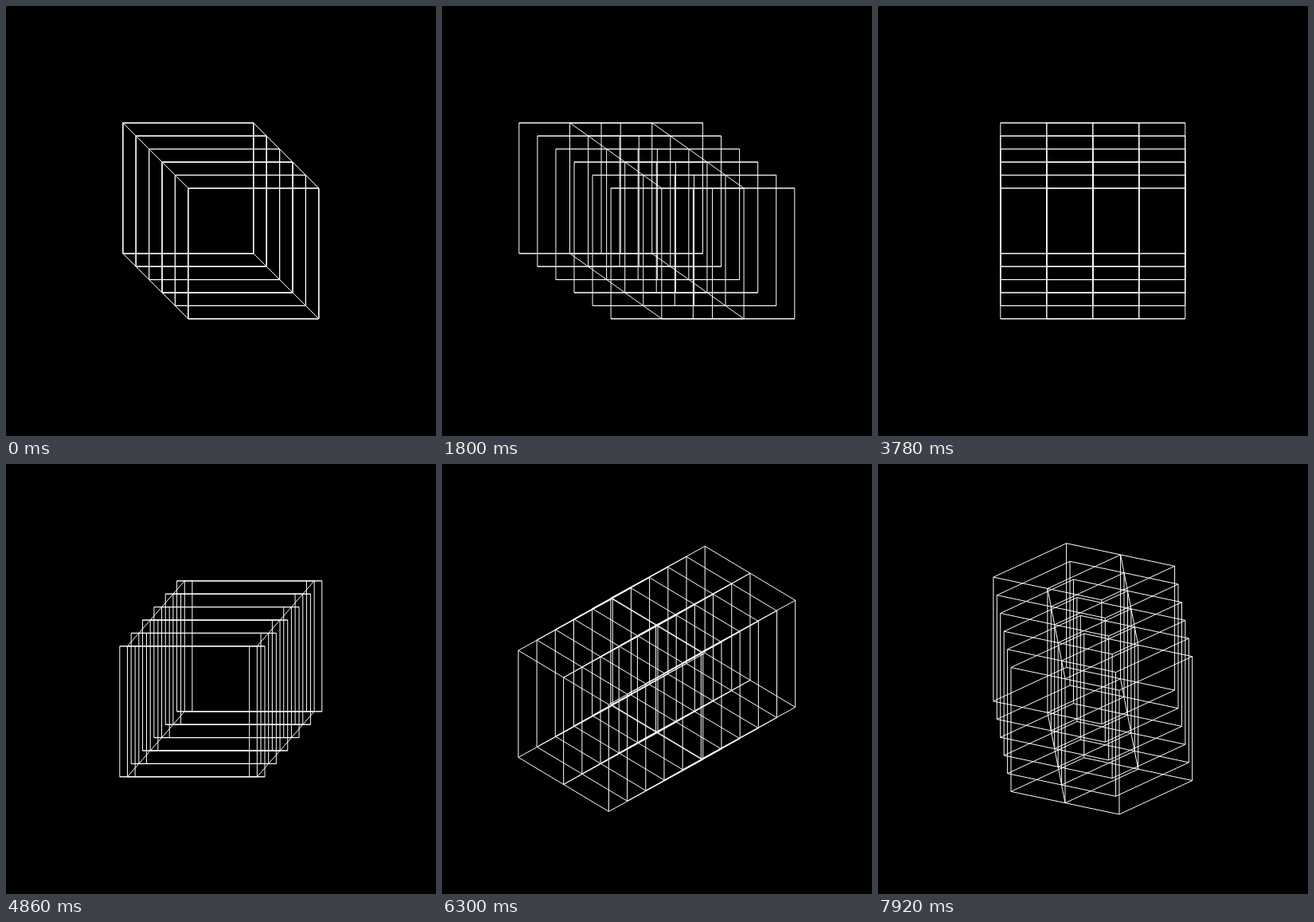
Write an HTML page with a canvas that moves like this. It is 540 px wide and 540 px high and loops after 8000 ms.

```html
<!DOCTYPE html>
<html lang="en">
<head>
<meta charset="utf-8">
<title>Stacked wire cubes</title>
<style>
  html, body { margin: 0; width: 100%; height: 100%; overflow: hidden; background: #000; }
  canvas { display: block; width: 540px; height: 540px; }
</style>
</head>
<body>
<canvas id="stage" width="540" height="540"></canvas>
<script>
const ctx = document.getElementById("stage").getContext("2d");
const LOOP = 8000, CENTER = 269.8, HALF = 82, LAYERS = 6, GAP = 16.4, TURN = 710;

// Each pose: middle of the turn that leads to it (ms), yaw and pitch in degrees
const poses = [
  [0, 0, 0],
  [635, 45, 0],
  [1986, 89.4, 0],
  [3335, 135, 0],
  [4686, 180, 0],
  [6020, 225, 36],
  [7380, 304, 198.2]
];

const rad = deg => deg * Math.PI / 180;
const ease = p => (1 - Math.cos(Math.PI * Math.min(1, Math.max(0, p)))) / 2;

function poseAt(t) {
  let [, yaw, pitch] = poses[0];
  for (let i = 1; i < poses.length; i++) {
    const [mid, y, x] = poses[i];
    const k = ease((t - mid) / TURN + 0.5);
    yaw += (y - poses[i - 1][1]) * k;
    pitch += (x - poses[i - 1][2]) * k;
  }
  return [rad(yaw), rad(pitch)];
}

function projector(yaw, pitch) {
  const cy = Math.cos(yaw), sy = Math.sin(yaw);
  const cp = Math.cos(pitch), sp = Math.sin(pitch);
  return (x, y, z) => {
    const depth = z * cy - x * sy;
    return [CENTER + x * cy + z * sy, CENTER - y * cp + depth * sp];
  };
}

function line(a, b) {
  ctx.beginPath();
  ctx.moveTo(...a);
  ctx.lineTo(...b);
  ctx.stroke();
}

function draw(t) {
  const project = projector(...poseAt(t));
  const corner = (layer, x, y, z) => {
    const d = (layer - (LAYERS - 1) / 2) * GAP;
    return project(x * HALF + d, y * HALF - d, z * HALF + d);
  };
  const signs = [-1, 1];

  ctx.fillStyle = "#000";
  ctx.fillRect(0, 0, 540, 540);
  ctx.strokeStyle = "#fff";
  ctx.lineWidth = 1;

  for (let n = 0; n < LAYERS; n++) {
    for (const a of signs) {
      for (const z of [-1, 0, 1]) {
        line(corner(n, -1, a, z), corner(n, 1, a, z));
        line(corner(n, a, -1, z), corner(n, a, 1, z));
      }
      for (const b of signs) line(corner(n, a, b, -1), corner(n, a, b, 1));
    }
  }
  // Rails through the middle slice of every cube
  for (const x of signs)
    for (const y of signs) line(corner(0, x, y, 0), corner(LAYERS - 1, x, y, 0));
}

const start = performance.now();
function tick() {
  draw((performance.now() - start) % LOOP);
  requestAnimationFrame(tick);
}
tick();
</script>
</body>
</html>
```
